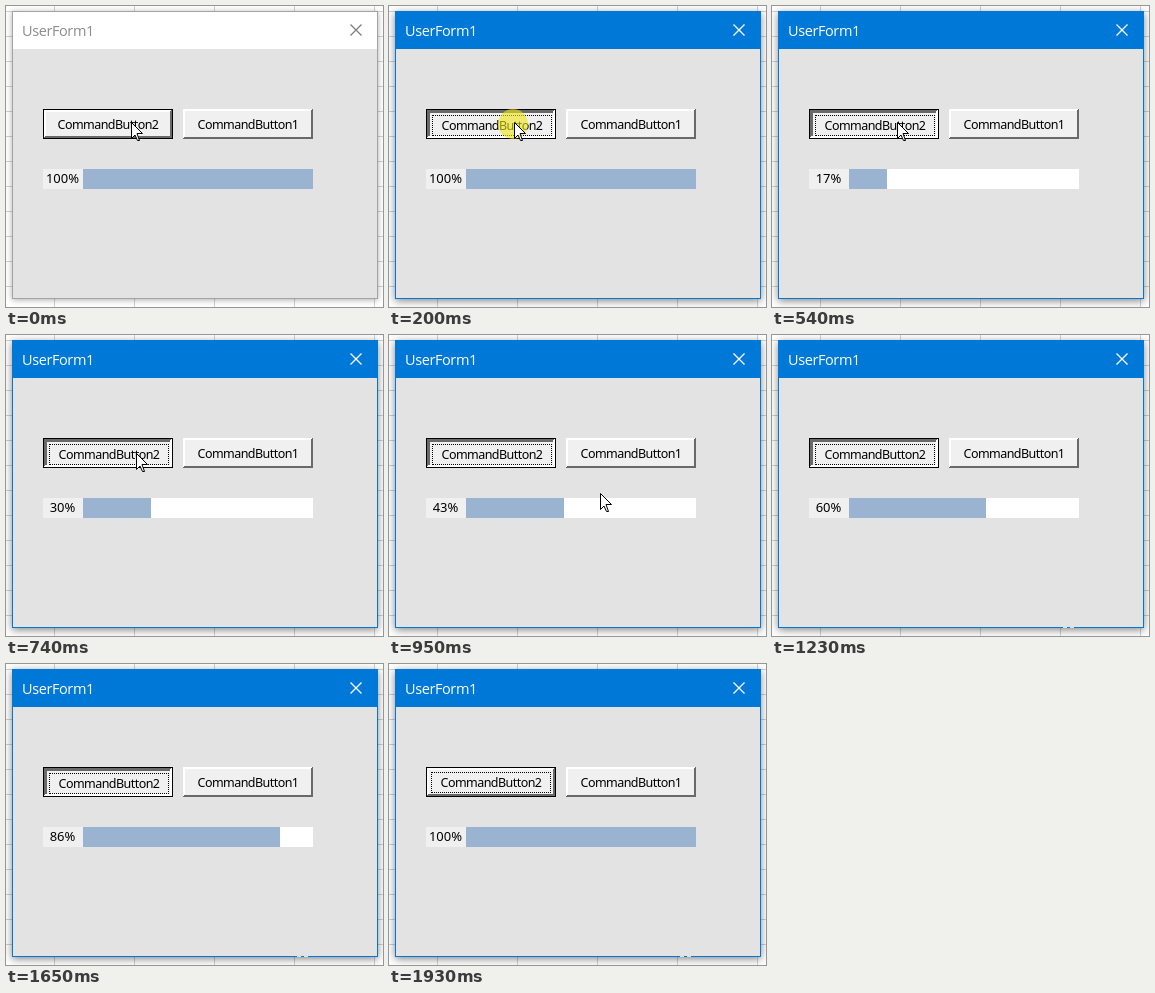
Animation of 377 by 301 pixels, one loop 2130 ms. Source, as an HTML page:

```html
<!DOCTYPE html>
<html lang="en">
<head>
<meta charset="utf-8">
<title>Progress form</title>
<style>
  html, body { margin: 0; width: 100%; height: 100%; overflow: hidden; }
  body { position: relative; background: #fff; }
  div, svg, i { position: absolute; box-sizing: border-box; }
  #grid { left: 0; top: 0; width: 377px; height: 301px; }
  #form {
    left: 6px; top: 5px; width: 366px; height: 288px;
    background: #e3e3e3; border: 1px solid #0078d7;
    box-shadow: 0 2px 8px rgba(0,0,0,.48);
  }
  #title {
    left: 6px; top: 5px; width: 366px; height: 38px; padding-left: 10px;
    background: #0078d7; color: #fff;
    font: 14.5px/40px "Open Sans", "Noto Sans", sans-serif; letter-spacing: -.4px;
  }
  #close { left: 344px; top: 18px; stroke: #fff; stroke-width: 1.3; }
  .idle #form { border-color: #a3a3a3; box-shadow: 0 1px 6px rgba(0,0,0,.32); }
  .idle #title {
    background: #fff; color: #8c8c8c;
    border: solid #a3a3a3; border-width: 1px 1px 0; line-height: 38px; padding-left: 9px;
  }
  .idle #close { stroke: #808080; }

  .button, #label {
    font: 12.5px/20px "Noto Sans", "Open Sans", sans-serif;
    text-align: center; color: #000; background: #f0f0f0; white-space: nowrap;
  }
  .button {
    top: 103px; width: 130px; height: 30px; line-height: 32px; letter-spacing: -.55px;
    box-shadow: inset -1px -1px #696969, inset 1px 1px #fff, inset -2px -2px #696969, inset 2px 2px #fff;
  }
  #second { left: 37px; border: 1px solid #000; line-height: 30px; }
  #first { left: 177px; }
  #focus { left: 4px; top: 4px; width: 120px; height: 21px; border: 1px dotted #000; }
  .idle #focus { display: none; }
  .down #second {
    padding: 1px 0 0 2px;
    box-shadow: inset -1px -1px #fff, inset 1px 1px #696969, inset -2px -2px #fff, inset 3px 3px #696969;
  }
  .down #focus { left: 5px; top: 5px; }

  #track { left: 77px; top: 163px; width: 230px; height: 20px; background: #fff; }
  #bar { left: 0; top: 0; height: 20px; background: #9ab3d1; }
  #label {
    left: 37px; top: 163px; width: 40px; height: 20px; padding-right: 1px;
    font-size: 13px; line-height: 18px;
  }
  #halo {
    left: 109px; top: 103px; width: 30px; height: 30px; border-radius: 50%;
    background: rgba(240,230,20,.6);
  }
  #cursor { left: 0; top: 0; overflow: visible; }
  #speck { left: 291px; top: 291px; width: 11px; height: 2px; border: solid #d6e2ec; border-width: 0 4px; }
</style>
</head>
<body class="idle">
  <svg id="grid" shape-rendering="crispEdges"><path id="lines" stroke="#d0d0d0" fill="none"/></svg>
  <div id="form"></div>
  <div id="title">UserForm1</div>
  <svg id="close" width="12" height="12" fill="none"><path d="M.5.5l11 11M11.5.5l-11 11"/></svg>
  <div id="second" class="button">CommandButton2<i id="focus"></i></div>
  <div id="first" class="button">CommandButton1</div>
  <div id="label"></div>
  <div id="track"><div id="bar"></div></div>
  <div id="halo"></div>
  <div id="speck"></div>
  <svg id="cursor" width="13" height="20">
    <path d="M.5.5v16l3.5-3.5 2.5 5.5h2l-2.5-7h5.5z" fill="#fff" stroke="#000"/>
  </svg>
<script>
const LOOP = 2130;
const LAST = 26;
const $ = id => document.getElementById(id);

// Pointer stops: [step, x, y]
const path = [[8, 125, 116], [9, 130, 118], [12, 211, 158], [14, 270, 238], [15, 291, 276]];

let d = "";
for (let y = 5; y < 301; y += 25) d += `M0 ${y + .5}H377`;
for (let x = 48; x < 377; x += 80) d += `M${x + .5} 0V301`;
$("lines").setAttribute("d", d);

function stepAt(t) {
  if (t < 200) return 0;
  if (t < 740) return Math.min(8, 1 + Math.floor((t - 200) / 66.6));
  return Math.min(LAST, 9 + Math.floor((t - 740) / 70));
}

function percentAt(step) {
  if (step < 2) return 100;
  return Math.max(0, Math.min(100, Math.round(17 + 4.3 * (step - 6))));
}

function pointerAt(step) {
  if (step <= path[0][0]) return path[0].slice(1);
  const i = path.findIndex(p => p[0] >= step);
  const [a, ax, ay] = path[i - 1], [b, bx, by] = path[i];
  const f = (step - a) / (b - a);
  return [Math.round(ax + (bx - ax) * f), Math.round(ay + (by - ay) * f)];
}

function show(id, on) {
  $(id).style.visibility = on ? "visible" : "hidden";
}

function draw(step) {
  const percent = percentAt(step);
  const pointing = step <= 15;
  document.body.className = step === 0 ? "idle" : step < LAST ? "down" : "";
  $("label").textContent = percent + "%";
  $("bar").style.width = (percent === 100 ? 230 : Math.max(0, Math.round(percent * 2.3 - 1))) + "px";
  show("halo", step === 1);
  show("speck", !pointing);
  show("cursor", pointing);
  if (pointing) {
    const [x, y] = pointerAt(step);
    $("cursor").style.transform = `translate(${x}px, ${y}px)`;
  }
}

const start = performance.now();
function tick() {
  draw(stepAt((performance.now() - start) % LOOP));
  requestAnimationFrame(tick);
}
tick();
</script>
</body>
</html>
```
